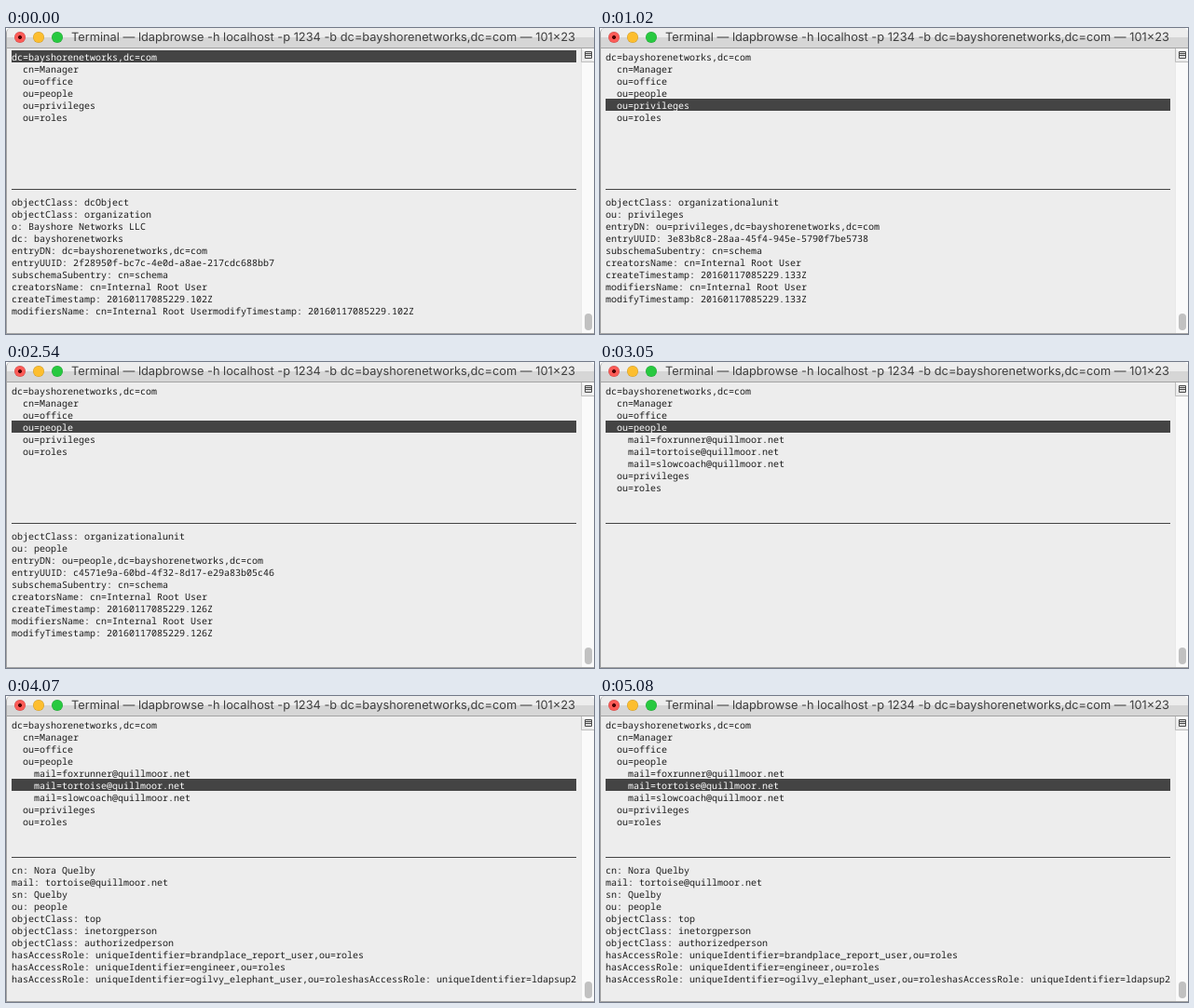
Recreate the animation shown at these times as an HTML page. Size 631 by 329 pixels, loop 7.11 s.

```html
<!DOCTYPE html>
<html lang="en">
<head>
<meta charset="utf-8">
<title>Terminal</title>
<style>
html, body { margin: 0; width: 100%; height: 100%; overflow: hidden; background: #fff; }
.window {
  position: relative; width: 631px; height: 329px; box-sizing: border-box; overflow: hidden;
  background: #ededed; border-radius: 5px 5px 0 0;
}
.window > * { position: absolute; }
.edge { inset: 0; border: solid #a3a3a3; border-width: 0 0 1px 1px; border-radius: 5px 5px 0 0; }
.bar {
  left: 0; top: 0; width: 631px; height: 22px; box-sizing: border-box;
  background: linear-gradient(#ededed 10px, #d6d6d6 10px); border-bottom: 1px solid #a3a3a3;
}
.title {
  left: 70px; top: 0; font: 12.8px/21px Inter, Roboto, sans-serif; color: #3e3e3e;
  white-space: pre; text-rendering: geometricPrecision;
}
.light { top: 4px; width: 12px; height: 12px; border-radius: 50%; box-shadow: inset 0 0 0 .5px #0003; }
.red { left: 9px; background: radial-gradient(circle, #4d0000 1.7px, #fc5b57 2.3px); }
.yellow { left: 29px; background: #fdbe2f; }
.green { left: 49px; background: #28c940; }
.scroll { left: 617px; top: 22px; width: 14px; height: 306px; background: #fafafa; border-left: 1px solid #e8e8e8; box-sizing: border-box; }
.thumb { left: 621px; top: 307px; width: 8px; height: 18px; border-radius: 4px; background: #c1c1c1; }
.split { left: 617px; top: 22px; }
.view { left: 6px; top: 24px; width: 606px; height: 288px; overflow: hidden; }
.strip {
  font: 10px/14px "Noto Sans Mono", "Liberation Mono", monospace;
  text-rendering: geometricPrecision; color: #1c1c1c;
  animation: play 7110ms step-end infinite;
}
.screen { position: relative; height: 288px; overflow: hidden; }
.line { height: 13px; white-space: pre; }
.selected { background: #444; color: #fff; }
.tree { height: 156px; }
.rule { position: absolute; top: 149px; width: 100%; height: 1px; background: #434343; }
@keyframes play {
  0% { transform: translateY(0); }
  7.173% { transform: translateY(-288px); }
  14.346% { transform: translateY(-576px); }
  21.519% { transform: translateY(-864px); }
  28.551% { transform: translateY(-1152px); }
  35.724% { transform: translateY(-1440px); }
  42.897% { transform: translateY(-1728px); }
  50.07% { transform: translateY(-2016px); }
  57.243% { transform: translateY(-2304px); }
  64.276% { transform: translateY(-2592px); }
  71.449%, 100% { transform: translateY(-2880px); }
}
</style>
</head>
<body>
<div class="window">
  <div class="bar"></div>
  <div class="light red"></div>
  <div class="light yellow"></div>
  <div class="light green"></div>
  <div class="title">Terminal — ldapbrowse -h localhost -p 1234 -b dc=bayshorenetworks,dc=com — 101×23</div>
  <div class="scroll"></div>
  <div class="thumb"></div>
  <svg class="split" width="14" height="15">
    <path d="M.5 0V14.5H14" fill="#ececec" stroke="#bdbdbd"/>
    <path d="M4.5 3.5h7v7h-7zM5 5.5h6M5 7.5h6" fill="#ddd" stroke="#4a4a4a"/>
  </svg>
  <div class="view"><div class="strip"></div></div>
  <div class="edge"></div>
</div>
<script>
const base = 'dc=bayshorenetworks,dc=com';
const root = 'cn=Internal Root User';
const domain = '@quillmoor.net';
const mails = ['foxrunner', 'tortoise', 'slowcoach'].map(name => name + domain);

const tree = (open = '') => {
  const children = {
    people: mails.map(mail => '    mail=' + mail),
    privileges: ['    uniqueIdentifier=report_view']
  };
  const units = ['office', 'people', 'privileges', 'roles'].flatMap(
    unit => ['  ou=' + unit, ...(unit === open ? children[unit] : [])]);
  return [base, '  cn=Manager', ...units];
};

const entry = (head, dn, uuid, ms) => {
  const stamp = `20160117085229.${ms}Z`;
  return [
    ...head, 'entryDN: ' + dn, 'entryUUID: ' + uuid, 'subschemaSubentry: cn=schema',
    'creatorsName: ' + root, 'createTimestamp: ' + stamp,
    'modifiersName: ' + root, 'modifyTimestamp: ' + stamp
  ];
};

const unit = (name, uuid, ms) =>
  entry(['objectClass: organizationalunit', 'ou: ' + name], `ou=${name},${base}`, uuid, ms);

const role = name => 'hasAccessRole: uniqueIdentifier=' + name;
const person = (first, last, mail, ...roles) => [
  `cn: ${first} ${last}`, 'mail: ' + mail, 'sn: ' + last, 'ou: people',
  ...['top', 'inetorgperson', 'authorizedperson'].map(type => 'objectClass: ' + type),
  ...roles.slice(0, 2).map(name => role(name) + ',ou=roles'),
  role(roles[2]) + ',ou=roles' + role(roles[3])
];

const company = entry(
  ['objectClass: dcObject', 'objectClass: organization', 'o: Bayshore Networks LLC', 'dc: bayshorenetworks'],
  base, '2f28950f-bc7c-4e0d-a8ae-217cdc688bb7', 102);
// The tenth line runs on where the pane ends.
company.push(company.splice(-2).join(''));

const manager = entry(['objectClass: organizationalRole', 'cn: Manager'],
  'cn=Manager,' + base, '7b0c41d2-93e5-4a6f-b1c8-06fd52e9a374', 117);
const privileges = unit('privileges', '3e83b8c8-28aa-45f4-945e-5790f7be5738', 133);
const people = unit('people', 'c4571e9a-60bd-4f32-8d17-e29a83b05c46', 126);

const first = person('Ivo', 'Talvero', mails[0],
  'engineer', 'ogilvy_elephant_user', 'ldapsuperadmin', 'ogilvy_eagle_2');
const second = person('Nora', 'Quelby', mails[1],
  'brandplace_report_user', 'engineer', 'ogilvy_elephant_user', 'ldapsup2');
const third = person('Otto', 'Brenvik', mails[2],
  'engineer', 'brandplace_report_user', 'ldapsuperadmin', 'ogilvy_eleph2');

const closed = tree(), openPeople = tree('people');
const screens = [
  [closed, 0, company],
  [closed, 1, manager],
  [closed, 4, privileges],
  [tree('privileges'), 4, []],
  [closed, 4, []],
  [closed, 3, people],
  [openPeople, 3, []],
  [openPeople, 4, first],
  [openPeople, 5, second],
  [openPeople, 6, third],
  [openPeople, 5, second]
];

const lines = (rows, selected) => rows.map(
  (text, i) => `<div class="line${i === selected ? ' selected' : ''}">${text}</div>`).join('');

document.querySelector('.strip').innerHTML = screens.map(([rows, selected, details]) =>
  `<div class="screen"><div class="tree">${lines(rows, selected)}</div>` +
  `<div class="rule"></div>${lines(details)}</div>`).join('');
</script>
</body>
</html>
```
